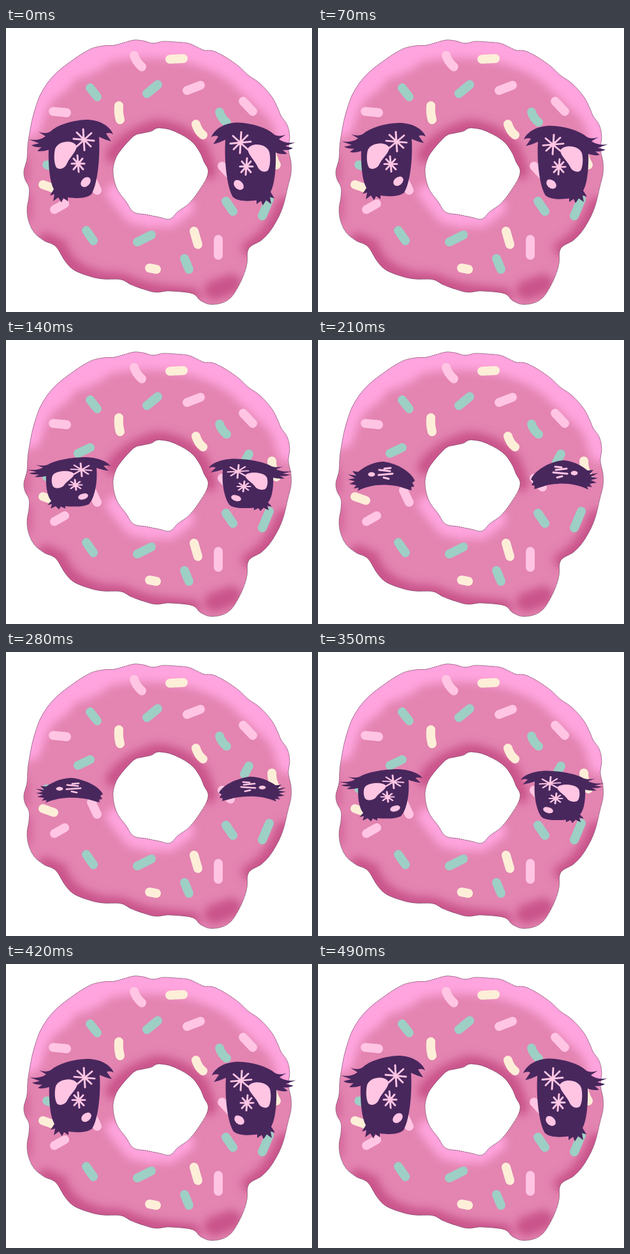
These frames come from a looping animation (480x446 px, 0.91 s). An HTML page:

```html
<!DOCTYPE html>
<html lang="en">
<head>
<meta charset="utf-8">
<title>Blinking donut</title>
<style>
  html, body { margin: 0; width: 100%; height: 100%; overflow: hidden; background: #fff; }
  svg { display: block; width: 100vw; height: 100vh; }
  .dark { fill: #48275d; }
  .shine { fill: #ffc5e3; }
  .star { fill: none; stroke: #ffc5e3; stroke-width: 3; stroke-linecap: round; }
  .round { fill: none; stroke-linecap: round; stroke-linejoin: round; }
</style>
</head>
<body>
<svg viewBox="0 0 480 446" preserveAspectRatio="none">
  <defs>
    <filter id="soft" filterUnits="userSpaceOnUse" x="0" y="0" width="480" height="446"><feGaussianBlur stdDeviation="7"/></filter>
    <clipPath id="inside"><path id="mask" clip-rule="evenodd"/></clipPath>

    <g id="open">
      <path class="dark" d="M67 184C66 213 68 240 75 253L69 263L76 261L74 272L82 266L87 274L90 267L97 272L97 266C110 268 126 268 134 261C143 247 148 206 146 172Z"/>
      <path class="dark" d="M36 175Q52 178 62 170L51 163Q62 167 69 163C82 151 105 145 126 144C147 144 163 154 168 167Q162 163 157 166L165 178Q156 176 146 171L144 184L70 190Q58 195 49 193L56 187Q46 188 40 184L52 181Z"/>
      <path class="shine" d="M77 190C82 176 107 175 111 186C110 195 100 203 96 212C92 222 83 223 79 219C75 212 75 198 77 190Z"/>
      <path class="star" d="M121 159L123 192M106 174L138 177M111 164L133 186M134 165L111 186"/>
      <path class="star" d="M112 200L114 226M103 213L123 213M106 205L121 222M120 205L106 222"/>
      <ellipse class="shine" rx="9" ry="6.5" transform="translate(125 242) rotate(-45)"/>
    </g>

    <g id="closed">
      <path class="dark" d="M63 207C75 197 90 191 103 191C125 194 146 207 152 221L148 224L151 230L146 231L147 236C137 234 130 230 121 229C101 226 82 227 62 237L64 232L56 233L60 228L49 226L58 222L47 219L58 217L47 211L60 213L54 206Z"/>
      <ellipse class="shine" cx="84" cy="211" rx="5.5" ry="3.5"/>
      <path class="star" stroke-width="2" d="M96 204L113 206M95 212L117 210M103 216L111 218M104 202L114 201"/>
    </g>
  </defs>
  <g clip-path="url(#inside)">
    <rect width="480" height="446" fill="#e384b1"/>
    <g id="shading" filter="url(#soft)"></g>
    <g id="sprinkles"></g>
  </g>
  <path id="outline" fill="none" stroke="#57334f" stroke-width="1" stroke-dasharray="2 1" opacity=".75"/>
  <use id="leftEye"/>
  <use id="rightEye"/>
</svg>
<script>
const byId = id => document.getElementById(id);

function add(parent, tag, attributes) {
  const node = document.createElementNS('http://www.w3.org/2000/svg', tag);
  for (const key in attributes) node.setAttribute(key, attributes[key]);
  byId(parent).append(node);
}

// Catmull-Rom curve through a closed ring of "x,y" points.
function ring(text) {
  const points = text.trim().split(/\s+/).map(p => p.split(',').map(Number));
  const at = i => points[(i + points.length) % points.length];
  let d = 'M' + points[0];
  points.forEach((p, i) => {
    const before = at(i - 1), next = at(i + 1), after = at(i + 2);
    const c1 = p.map((v, k) => v + (next[k] - before[k]) / 6);
    const c2 = next.map((v, k) => v - (after[k] - p[k]) / 6);
    d += `C${c1} ${c2} ${next}`;
  });
  return d + 'Z';
}

const outer = ring(`231,24 247,21 267,22 286,24 300,30 311,35 325,36 345,46 365,60
  380,74 396,85 409,98 419,111 426,125 432,139 441,152 445,170 443,190 447,210
  447,229 442,250 436,275 428,296 415,318 401,333 385,342 379,351 378,370 372,390
  362,410 352,424 338,432 320,434 305,428 292,417 257,413 235,415 215,410 196,403
  180,395 150,394 125,388 105,379 92,365 78,343 60,334 45,322 36,305 33,285
  36,265 36,250 30,238 28,225 33,205 34,185 37,165 42,140 50,114 58,97 70,80
  85,65 105,50 120,40 135,32 152,28 170,27 185,23 200,19 215,20`);
const hole = ring(`238,157 255,159 270,165 283,172 295,182 305,197 311,211 317,223
  314,237 303,255 292,270 283,279 270,288 257,300 240,297 220,293 200,289 188,272
  176,256 170,240 168,222 172,205 180,192 192,178 203,168 215,165 228,162`);
byId('mask').setAttribute('d', outer + hole);
byId('outline').setAttribute('d', outer + hole);

const LIGHT = '#ffa4de', DARK = '#c9528a';
const shades = [
  [LIGHT, 44, 'M34 150Q48 100 76 78T130 42T205 25T300 36T370 72T418 116T446 170'],
  [LIGHT, 18, 'M72 104L96 84M120 68L150 53M334 62L350 70M386 94L400 110'],
  [DARK, 24, 'M168 200Q190 168 238 156Q286 162 306 192L318 225'],
  [LIGHT, 26, 'M170 258Q185 278 198 292L256 300L282 281'],
  [LIGHT, 16, 'M200 300L232 306'],
  [DARK, 24, 'M62 334L84 344Q95 382 150 395L184 398Q215 413 250 416L292 420'],
  [DARK, 30, 'M326 412L354 402'],
  [DARK, 24, 'M382 346Q416 328 436 278'],
  [DARK, 8, 'M30 205L30 240M34 260L34 300']
];
for (const [stroke, width, d] of shades)
  add('shading', 'path', { class: 'round', stroke, 'stroke-width': width, d });

const sprinkles = {
  '#ffc5e3': 'M201 43Q204 53 213 61M74 131L95 133M284 98L305 90M372 115L387 131M76 285L92 276M333 332V357M134 236L143 255M339 217L352 231',
  '#fdeed8': 'M257 49L278 48M177 122Q176 134 179 144M298 151Q301 162 309 168M58 246L75 252M295 319L301 340M225 377L236 379M417 190Q417 204 424 215',
  '#9dcfc5': 'M132 94L143 108M221 103L238 89M335 132Q338 142 346 148M113 178L132 169M126 318L137 334M206 336L228 325M345 272L356 288M413 269L402 295M280 362L287 379M381 179L374 192M64 215L88 222'
};
for (const stroke in sprinkles)
  add('sprinkles', 'path', { class: 'round', stroke, 'stroke-width': 14, d: sprinkles[stroke] });

// Each pose: shape, vertical scale, shift of both eyes, right eye's extra drop, mirror axis sum.
const pose = (shape, scale, dx, dy, drop, mirror) => ({ shape, scale, dx, dy, drop, mirror });
const wide = pose('open', 1, 0, 0, 4.5, 490);
const easing = pose('open', 0.935, 1, 14.4, 4.5, 490);
const half = pose('open', 0.63, -4, 93.3, 2.5, 490);
const shut = pose('closed', 1, 0, 0, -2, 486);
const squeezed = pose('closed', 0.85, 0, 35.4, -2, 486);
const blink = [wide, easing, half, shut, squeezed, half, easing];
const STEP = 70, LOOP = 910;

function draw(now) {
  const p = blink[Math.floor(now % LOOP / STEP)] || wide;
  const left = byId('leftEye'), right = byId('rightEye');
  left.setAttribute('href', '#' + p.shape);
  right.setAttribute('href', '#' + p.shape);
  left.setAttribute('transform', `matrix(1 0 0 ${p.scale} ${p.dx} ${p.dy})`);
  right.setAttribute('transform', `matrix(-1 0 0 ${p.scale} ${p.mirror + p.dx} ${p.dy + p.drop})`);
}

const start = performance.now();
function tick() {
  draw(performance.now() - start);
  requestAnimationFrame(tick);
}
tick();
</script>
</body>
</html>
```
